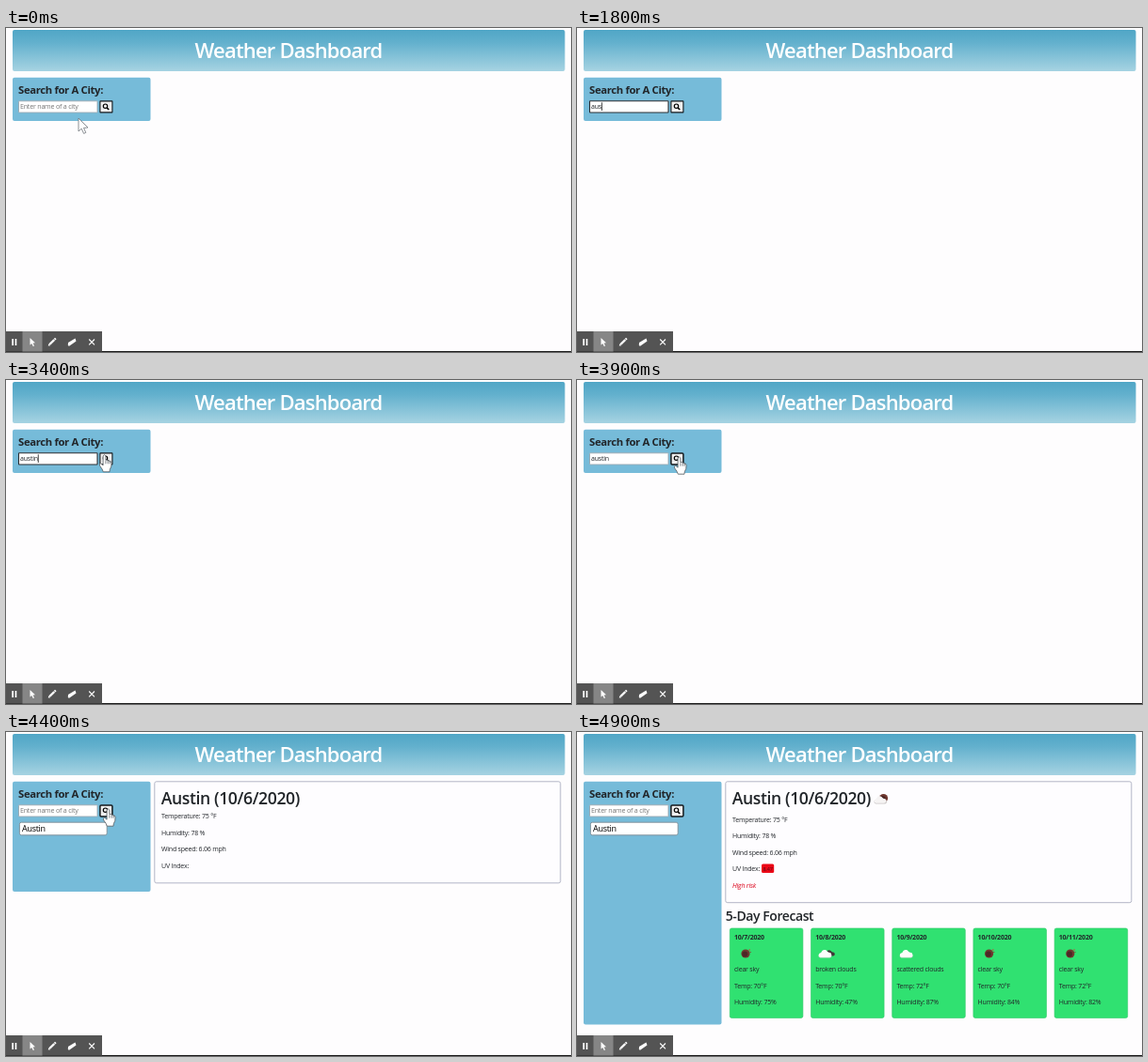
Write an HTML page with a canvas that moves like this. It is 600 px wide and 345 px high and loops after 5000 ms.

```html
<!DOCTYPE html>
<html lang="en">
<head>
<meta charset="utf-8">
<title>Weather Dashboard</title>
<style>
html, body { margin: 0; width: 100%; height: 100%; overflow: hidden; background: #fefdfe; }
canvas { display: block; width: 600px; height: 345px; }
</style>
</head>
<body>
<canvas id="stage"></canvas>
<script>
const canvas = document.getElementById('stage');
const c = canvas.getContext('2d');
const dpr = window.devicePixelRatio || 1;
canvas.width = 600 * dpr;
canvas.height = 345 * dpr;

const LOOP = 5000, STEP = 100;
const INK = '#212529', BLUE = '#76bbd9', GREEN = '#30e171';

// Time at which each letter of the query has been typed.
const QUERY = 'austin';
const KEYS = [1200, 1600, 1800, 2100, 2300, 2400];

const DAYS = [
  ['10/7/2020', 'clear sky', 70, 75],
  ['10/8/2020', 'broken clouds', 70, 47],
  ['10/9/2020', 'scattered clouds', 72, 87],
  ['10/10/2020', 'clear sky', 70, 84],
  ['10/11/2020', 'clear sky', 72, 82]
];

const between = (t, a, b) => t >= a && t < b;

function text(s, x, y, size = 7, { weight = 400, color = INK, style = '', track = -0.03, align = 'left' } = {}) {
  c.font = `${style} ${weight} ${size}px "Open Sans", "Noto Sans", sans-serif`;
  c.letterSpacing = size * track + 'px';
  c.textAlign = align;
  c.fillStyle = color;
  c.fillText(s, x, y);
  return c.measureText(s).width;
}

function box(x, y, w, h, r, fill, stroke, line = 1) {
  c.beginPath();
  c.roundRect(x, y, w, h, r);
  if (fill) { c.fillStyle = fill; c.fill(); }
  if (stroke) { c.strokeStyle = stroke; c.lineWidth = line; c.stroke(); }
}

function poly(points, fill, stroke, line = 1) {
  c.beginPath();
  points.forEach(([x, y]) => c.lineTo(x, y));
  c.closePath();
  if (fill) { c.fillStyle = fill; c.fill(); }
  if (stroke) { c.strokeStyle = stroke; c.lineWidth = line; c.stroke(); }
}

function segment(x1, y1, x2, y2, color, line) {
  c.beginPath();
  c.moveTo(x1, y1);
  c.lineTo(x2, y2);
  c.strokeStyle = color;
  c.lineWidth = line;
  c.stroke();
}

function disc(x, y, r, fill) {
  c.beginPath();
  c.arc(x, y, r, 0, 7);
  c.fillStyle = fill;
  c.fill();
}

function at(x, y, draw) {
  c.save();
  c.translate(x, y);
  draw();
  c.restore();
}

function cloud(x, y, k, fill) {
  at(x, y, () => {
    c.scale(k, k);
    c.beginPath();
    c.moveTo(-5.5, 4);
    c.arc(-5, 1.6, 2.4, 1.8, 4.6);
    c.arc(-1, -0.6, 3.5, 3.4, 5.8);
    c.arc(4.2, 1.4, 2.6, 4.6, 1.57);
    c.closePath();
    c.fillStyle = fill;
    c.fill();
  });
}

function sun(x, y, r) {
  disc(x, y, r, '#70382f');
  disc(x - r * 0.15, y + r * 0.1, r * 0.65, '#4c2826');
}

function weatherIcon(kind, x, y) {
  if (kind === 'clear sky') {
    sun(x + 1, y, 4.6);
    disc(x + 5.2, y - 4, 0.8, '#c84a35');
    disc(x + 6.2, y - 1.6, 0.6, '#8a4030');
  } else {
    if (kind === 'broken clouds') cloud(x + 4.5, y - 0.5, 0.75, '#403a38');
    cloud(x - 0.5, y + 0.6, 0.98, '#d3dcd7');
    cloud(x - 0.5, y - 0.1, 0.95, '#fbfdfb');
  }
}

function header() {
  const g = c.createLinearGradient(0, 2, 0, 46);
  g.addColorStop(0, '#50a6c6');
  g.addColorStop(0.3, '#62b0cd');
  g.addColorStop(1, '#a6d3e2');
  box(7, 2, 586.5, 44, 2, g);
  text('Weather Dashboard', 300, 31.5, 22, { weight: 600, color: '#fff', track: -0.036, align: 'center' });
}

function toolbar() {
  c.fillStyle = '#1c1c1c';
  c.fillRect(0, 344, 600, 1);
  c.fillStyle = '#545454';
  c.fillRect(0, 323, 102, 21.5);
  c.fillStyle = '#868686';
  c.fillRect(17.5, 323, 21, 21.5);
  c.fillStyle = '#fff';
  c.fillRect(6.3, 331, 1.7, 7);
  c.fillRect(9.6, 331, 1.7, 7);
  poly([[25.5, 330], [25.5, 337.5], [27.3, 336], [28.8, 339], [30, 338.4], [28.6, 335.5], [31, 335.3]], '#fff');
  segment(46.2, 337, 51.3, 332, '#fff', 2.4);
  segment(51.6, 331.6, 52.8, 330.5, '#fff', 2.2);
  poly([[44.8, 338.6], [45.2, 336.2], [47.2, 338.2]], '#fff');
  poly([[66, 335], [73.5, 330.5], [74.5, 333.5], [67, 338.8], [65.8, 338]], '#fff');
  segment(88.2, 331.5, 94, 337.3, '#fff', 1.1);
  segment(94, 331.5, 88.2, 337.3, '#fff', 1.1);
}

function caretOn(t) {
  if (t < 100 || t >= 3900) return false;
  return !between(t, 600, 900) && !between(t, 2900, 3200);
}

function searchPanel(t) {
  const bottom = t >= 4500 ? 311.5 : t >= 4400 ? 170 : 99;
  box(7, 52.7, 146.5, bottom - 52.7, 2, BLUE);
  text('Search for A City:', 13, 69.8, 11.3, { weight: 700 });

  const focused = between(t, 100, 3900);
  box(13.5, 77.8, 83.5, 12.2, 0.5, '#fff', focused ? '#2b2f33' : '#9aa9b1', focused ? 1.1 : 0.9);
  const typed = t < 4100 ? QUERY.slice(0, KEYS.filter(k => t >= k).length) : '';
  let width = 0;
  if (typed) width = text(typed, 15, 86.3, 7);
  else text('Enter name of a city', 15, 86.3, 7.1, { color: '#757575' });
  if (caretOn(t)) {
    c.fillStyle = '#111';
    c.fillRect(15 + width, 79.3, 0.8, 8.7);
  }

  const clicked = t >= 3900;
  box(99.9, 77.9, 13, 12, clicked ? 1.2 : 0.3, '#efefef', '#15191c', clicked ? 1.5 : 1.1);
  c.beginPath();
  c.arc(105.5, 83.2, 2.2, 0, 7);
  c.strokeStyle = '#000';
  c.lineWidth = 1.2;
  c.stroke();
  segment(107.1, 84.9, 109.2, 87, '#000', 1.5);

  if (t >= 4400) {
    box(14.4, 96.2, 92.8, 13.6, 2, '#fff', '#7f8d96', 0.9);
    text('Austin', 17, 106.3, 9, { color: '#000' });
  }
}

function currentCard(t) {
  if (t < 4100) return;
  const full = t >= 4500;
  const bottom = full ? 181.7 : t >= 4400 ? 160.8 : 66.5;
  box(157.8, 52.8, 431, bottom - 52.8, 2, '#fefdff', '#b3b6c6', 1);
  if (t < 4400) return;

  text('Austin (10/6/2020)', 164.8, 77.3, 17.6, { weight: 600, track: -0.022 });
  const y = full ? 95.8 : 92.3;
  ['Temperature: 75 °F', 'Humidity: 78 %', 'Wind speed: 6.06 mph', 'UV Index:']
    .forEach((line, i) => text(line, 165, y + i * 17.5));
  if (!full) return;

  sun(325.5, 70.5, 4.6);
  cloud(322.5, 72.8, 0.95, '#c9c5c5');
  cloud(322.3, 72.1, 0.9, '#f6f4f4');
  box(196, 140.4, 13.2, 9.6, 1.6, '#ec0717');
  text('8.47', 202.5, 147.5, 5.5, { color: '#5b0611', align: 'center' });
  text('High risk', 165, 165.6, 7, { style: 'italic', color: '#dc0a20' });
}

function forecast(t) {
  if (t < 4500) return;
  text('5-Day Forecast', 157.8, 200.6, 14, { weight: 600 });
  DAYS.forEach(([date, sky, temp, humidity], i) => {
    const x = 162 + i * 86.2;
    box(x + 0.3, 209, 77.6, 95.5, 2, GREEN, '#2ac866', 0.6);
    text(date, x + 5, 220.6, 7, { weight: 700 });
    weatherIcon(sky, x + 16, 236);
    text(sky, x + 5, 255.4);
    text(`Temp: ${temp}°F`, x + 5, 272.9);
    text(`Humidity: ${humidity}%`, x + 5, 290.4);
  });
}

function arrow() {
  poly([[0, 0], [0, 14], [3.2, 11.2], [5.6, 16.4], [7.8, 15.4], [5.5, 10.4], [10, 10]], '#fff', '#6f747a', 0.8);
}

function beam() {
  segment(0, -4.5, 0, 4.5, '#333', 0.7);
  segment(-1.5, -4.5, 1.5, -4.5, '#333', 0.6);
  segment(-1.5, 4.5, 1.5, 4.5, '#333', 0.6);
}

function hand() {
  c.beginPath();
  c.moveTo(-1.4, 11.5);
  c.lineTo(-1.4, 1.5);
  c.quadraticCurveTo(0, -0.8, 1.4, 1.5);
  c.lineTo(1.4, 6);
  c.quadraticCurveTo(3, 5, 3.7, 6.6);
  c.quadraticCurveTo(5.2, 5.9, 5.7, 7.5);
  c.quadraticCurveTo(7.6, 7, 7.6, 9.2);
  c.quadraticCurveTo(7.8, 13, 5.8, 16);
  c.lineTo(5.5, 18.5);
  c.lineTo(-1.2, 18.5);
  c.quadraticCurveTo(-1.8, 16, -4.8, 12.2);
  c.quadraticCurveTo(-5.8, 9.8, -3.8, 9.5);
  c.closePath();
  c.fillStyle = '#fff';
  c.fill();
  c.strokeStyle = '#51575c';
  c.lineWidth = 0.8;
  c.stroke();
  for (const x of [1.4, 3.7, 5.7]) segment(x, 6.5, x, 10, '#51575c', 0.7);
}

function pointer(t) {
  if (t < 100) at(77, 96, arrow);
  else if (t < 1200) at(75.5, 83.2, beam);
  else if (between(t, 3200, 3400)) at(76 + (t - 3200) * 0.14, 83.2, beam);
  else if (between(t, 3400, 4700)) {
    const p = Math.min(1, (t - 3400) / 300);
    at(104.5 + 4 * p, 79.3 + 2.4 * p, hand);
  }
}

function draw() {
  const t = Math.floor(performance.now() % LOOP / STEP) * STEP;
  c.setTransform(dpr, 0, 0, dpr, 0, 0);
  c.fillStyle = '#fefdfe';
  c.fillRect(0, 0, 600, 345);
  header();
  searchPanel(t);
  currentCard(t);
  forecast(t);
  toolbar();
  pointer(t);
  requestAnimationFrame(draw);
}
draw();
</script>
</body>
</html>
```
